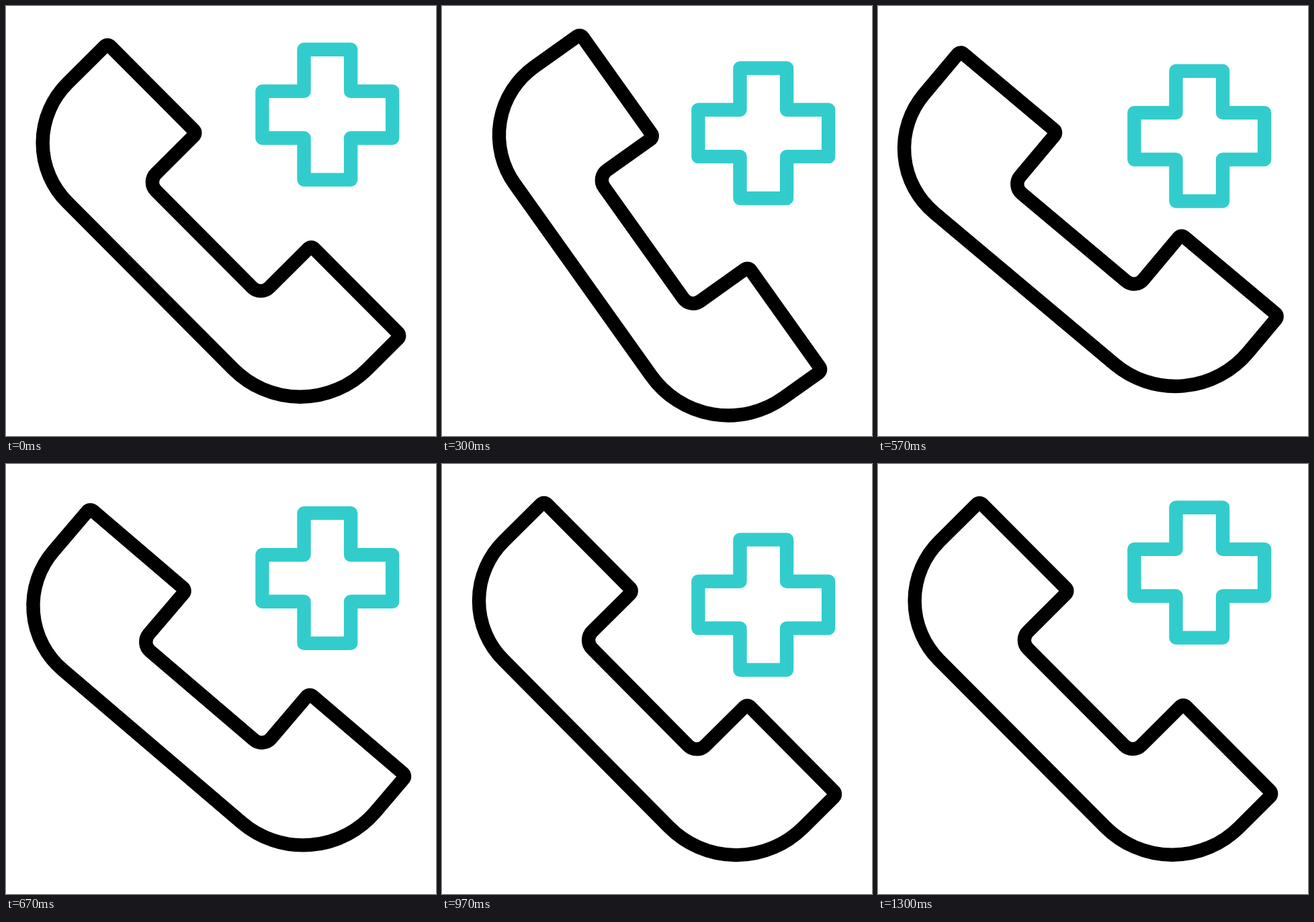
Write an HTML page with a canvas that moves like this. It is 640 by 640 pixels and loops after 1670 ms.

```html
<!DOCTYPE html>
<html lang="en">
<head>
<meta charset="utf-8">
<title>Emergency call</title>
<style>
  html, body { margin: 0; height: 100%; overflow: hidden; background: #fff; }
  canvas { display: block; width: 100vw; height: 100vh; }
</style>
</head>
<body>
<canvas id="stage" width="640" height="640"></canvas>
<script>
const ctx = document.getElementById('stage').getContext('2d');
const LOOP = 1670, FPS = 30;
const TILT = 45.12;

// Closed outline through corners [x, y, radius]
function outline(corners) {
  const path = new Path2D();
  const [x0, y0] = corners[0], [x1, y1] = corners.at(-1);
  path.moveTo((x0 + x1) / 2, (y0 + y1) / 2);
  corners.forEach(([x, y, r = 0], i) => {
    const [nextX, nextY] = corners[(i + 1) % corners.length];
    path.arcTo(x, y, nextX, nextY, r);
  });
  path.closePath();
  return path;
}

// Handset lying flat, measured from its pivot
function handsetOutline() {
  const left = -310.9, right = 305.5, innerLeft = -122.8, innerRight = 116.4;
  const ear = -150.2, mouth = -152.6, grip = -46.6, back = 59;
  const tip = 6, bend = 18;
  return outline([
    [innerLeft, ear, tip], [innerLeft, grip, bend],
    [innerRight, grip, bend], [innerRight, mouth, tip],
    [right, mouth, tip], [right, back, 141],
    [left, back, 125], [left, ear, tip]
  ]);
}

// One arm, repeated in quarter turns
function crossOutline(reach, half) {
  const corners = [];
  let arm = [[reach, -half], [reach, half], [half, half]];
  for (let i = 0; i < 4; i++) {
    corners.push(...arm);
    arm = arm.map(([x, y]) => [-y, x]);
  }
  return outline(corners);
}

// Smooth move between stops; steepness above 1 rests briefly at each stop
function glide(frame, stops, steepness, valueOf) {
  const i = stops.findLastIndex(stop => stop <= frame);
  if (i < 0 || i === stops.length - 1) return 0;
  const linear = (frame - stops[i]) / (stops[i + 1] - stops[i]);
  const p = Math.min(1, Math.max(0, (linear - 0.5) * steepness + 0.5));
  const from = valueOf(i), to = valueOf(i + 1);
  return from + (to - from) * p * p * (3 - 2 * p);
}

// Each swing goes the other way and half as far
const swing = frame => glide(frame, [3.6, 11.6, 18.2, 24.7, 29.9], 1.15,
  i => i % 4 ? 12 * (-0.5) ** (i - 1) : 0);
const bob = frame => glide(frame, [3.7, 13.4, 22.5, 29.55, 38.7], 1.05,
  i => i % 2 * 48.3);

function strokeAt(path, color, x, y, degrees = 0) {
  ctx.save();
  ctx.translate(x, y);
  ctx.rotate(degrees * Math.PI / 180);
  ctx.strokeStyle = color;
  ctx.stroke(path);
  ctx.restore();
}

const handset = handsetOutline();
const cross = crossOutline(96.9, 34.8);
ctx.lineWidth = 20.4;
ctx.lineJoin = 'round';

function draw(ms) {
  const frame = Math.floor(ms % LOOP * FPS / 1000 + 0.01);
  ctx.clearRect(0, 0, 640, 640);
  strokeAt(handset, '#000', 264, 382, TILT + swing(frame));
  strokeAt(cross, '#3cc', 478.3, 161.7 + bob(frame));
}

const start = performance.now();
function tick() {
  draw(performance.now() - start);
  requestAnimationFrame(tick);
}
tick();
</script>
</body>
</html>
```
